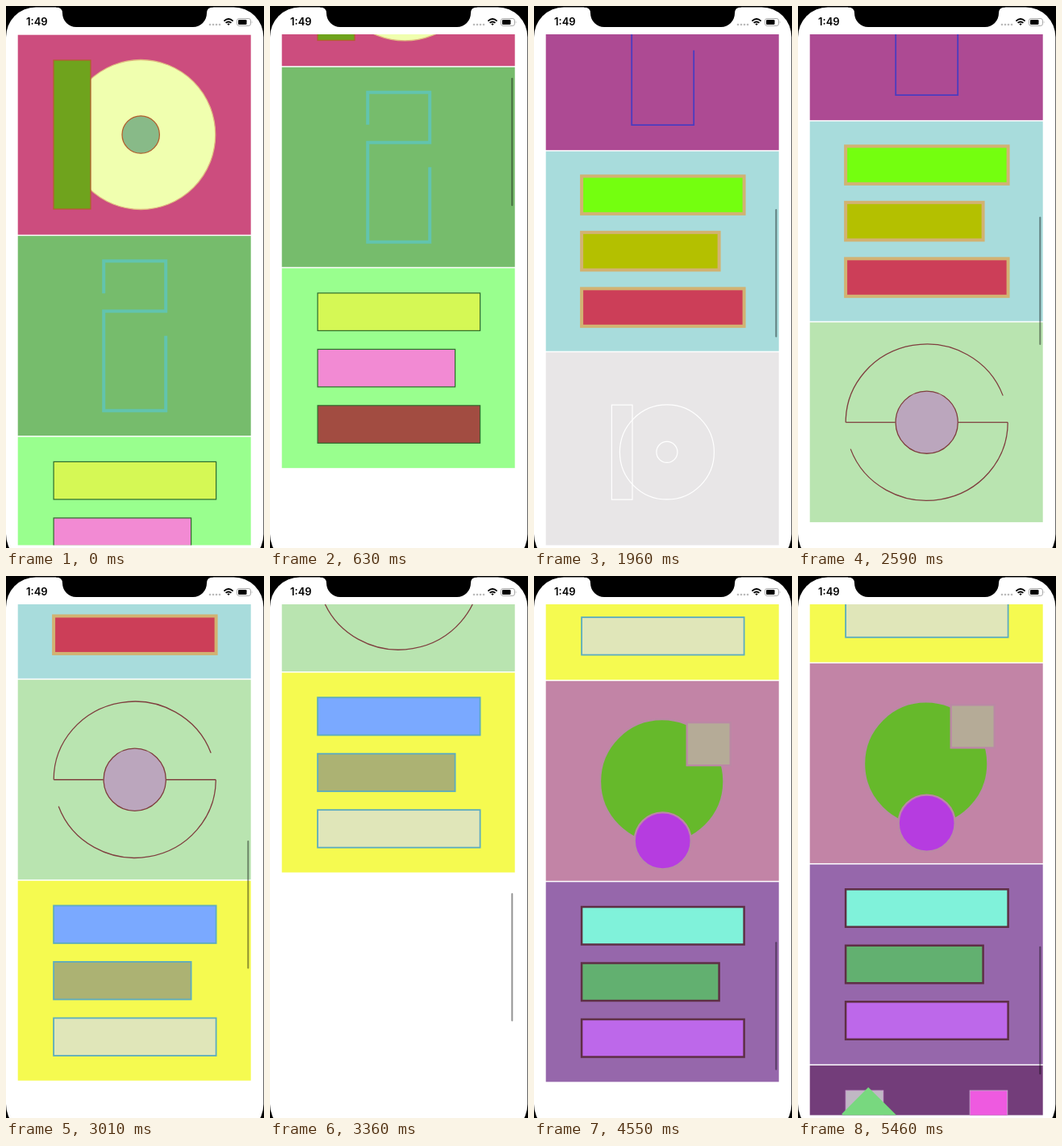
An HTML page for the animation above (5.53 s loop, 320x670 px).

```html
<!DOCTYPE html>
<html lang="en">
<head>
<meta charset="utf-8">
<title>Shape card list</title>
<style>
  html, body { margin: 0; width: 100%; height: 100%; overflow: hidden; background: #000; }
  svg { display: block; width: 320px; height: 670px; }
  text { font: 600 13px Inter, Roboto, sans-serif; }
</style>
</head>
<body>
<svg id="stage" viewBox="0 0 320 670">
  <defs>
    <clipPath id="list"><rect y="35" width="320" height="631.5"/></clipPath>
    <clipPath id="face"><rect width="289" height="247"/></clipPath>
  </defs>
  <rect y="1.5" width="319.4" height="688.5" rx="37" fill="#fff"/>
  <g id="cards" clip-path="url(#list)"></g>
  <path d="M62 0H257V1.5Q249 1.5 249 9A17 17 0 0 1 232 26H87A17 17 0 0 1 70 9Q70 1.5 62 1.5Z"/>
  <text x="25" y="24.3">1:49</text>
  <g fill="#bbb">
    <circle cx="253" cy="23" r="1.3"/><circle cx="257" cy="23" r="1.3"/>
    <circle cx="261" cy="23" r="1.3"/><circle cx="265" cy="23" r="1.3"/>
  </g>
  <g fill="none" stroke="#000" stroke-width="1.9">
    <path d="M270.4 18.6Q276 13.6 281.6 18.6M272.6 20.9Q276 17.9 279.4 20.9"/>
    <path d="M274.3 22.2L276 24L277.7 22.2Q276 21 274.3 22.2Z" fill="#000" stroke="none"/>
  </g>
  <rect x="286.5" y="15.5" width="17" height="9" rx="2.6" fill="none" stroke="#aaa"/>
  <rect x="288" y="17" width="10.5" height="6" rx="1.2"/>
  <path d="M304.8 18.5Q306.4 20 304.8 21.5Z" fill="#aaa"/>
  <rect id="thumb" x="299.3" width="2" height="158.5" rx="1" fill="#000" fill-opacity=".42"/>
</svg>
<script>
const LOOP = 5530, STEP = 70, LEFT = 14.7, TOP = 35.7, PITCH = 248.5;

// Card artwork, in coordinates relative to the card's corner.
const rect = (x, y, w, h, fill, extra = '') =>
  `<rect x="${x}" y="${y}" width="${w}" height="${h}" fill="${fill}" ${extra}/>`;
const disc = (x, y, r, fill) => `<circle cx="${x}" cy="${y}" r="${r}" fill="${fill}"/>`;
const card = (bg, stroke, width, art) =>
  rect(0, 0, 289, 247, bg) +
  `<g clip-path="url(#face)" stroke="${stroke}" stroke-width="${width}">${art}</g>`;

const bars = (bg, stroke, width, fills) => card(bg, stroke, width,
  fills.map((f, i) => rect(44.4, 30.7 + i * 69.5, i === 1 ? 170.5 : 201.5, 46.5, f)).join(''));

const two = (bg, stroke, width) => card(bg, stroke, width,
  '<path fill="none" d="M106.5 71V31H183.5V93H106.5V216H183.5V123.5"/>');

const ten = card('#cc4d7e', '#b2602f', 1.3,
  `<circle cx="152.5" cy="123.3" r="92.5" fill="#f0ffaf" stroke="#e0b880"/>` +
  disc(152.5, 123.3, 23.2, '#88ba88') + rect(44.3, 31.3, 46, 184, '#6fa31d'));

const orbit = card('#b9e4b0', '#7f3f3f', 1.3,
  '<path fill="none" d="M44.5 123.5A100.5 96.5 0 0 1 239.5 90.5' +
  'M245.5 123.5A100.5 96.5 0 0 1 50.5 156.5M44.5 123.5H106M184 123.5H245.5"/>' +
  disc(145, 123.5, 38.6, '#bba6bd'));

const blobs = card('#c284a6', '#bb88a5', 2.3,
  disc(144, 124, 76.7, '#66b92b') + rect(175, 51.3, 54, 53, '#b5ab97') +
  disc(145, 197.5, 35, '#b63ce0'));

const squares = card('#733d7a', '#c8a0cc', 1,
  rect(44.5, 31, 46.5, 46.5, '#c0b8c4') + rect(198.5, 31, 46.5, 46.5, '#ee5ae0') +
  '<path fill="#78d87f" stroke="none" d="M72.5 27L39.5 60L76 98L110 64Z"/>');

const skeleton = card('#e8e6e7', '#fff', 1.2,
  rect(81.7, 65, 25.6, 117, 'none') + disc(150.2, 123.3, 58.5, 'none') +
  disc(150.2, 123.3, 13, 'none'));

// [artwork, time the placeholder appears, time the artwork replaces it]
const deck = [
  [ten, 0, 0],
  [two('#76bc6c', '#62c4ae', 4), 0, 0],
  [bars('#99ff8e', '#2f6b2c', 1.2, ['#d5f855', '#f28ad3', '#a24c41']), 0, 0],
  [two('#ad4a93', '#4a3cc0', 1.8), 1120, 1400],
  [bars('#a8dcdc', '#d2b272', 4, ['#74ff0f', '#b4c000', '#cc3e58']), 1330, 1610],
  [orbit, 1540, 2170],
  [bars('#f5fa50', '#5cacc0', 1.8, ['#7aa9ff', '#acb273', '#e0e6b9']), 2660, 2940],
  [blobs, 3430, 3710],
  [bars('#9667ab', '#5e2f45', 2.5, ['#80f2da', '#62b070', '#bd68ea']), 3990, 4270],
  [squares, 4690, 4970]
];

const make = art => {
  const g = document.createElementNS('http://www.w3.org/2000/svg', 'g');
  g.innerHTML = art;
  document.getElementById('cards').append(g);
  return g;
};
const rows = deck.map(([art, shown, loaded]) =>
  ({ shown, loaded, art: make(art), ghost: make(skeleton) }));
const thumb = document.getElementById('thumb');

// Each flick: a short accelerating drag, then exponential momentum.
const TAU = 515;
const flicks = [
  { start: 350, release: 560, from: 0, to: 107.5, rest: 902.5 },
  { start: 2660, release: 2870, from: 889, to: 987, rest: 1671.6 }
];

function scrollAt(t) {
  const f = flicks.findLast(f => t >= f.start);
  if (!f) return 0;
  if (t < f.release) {
    const x = (t - f.start) / (f.release - f.start);
    return f.from + (f.to - f.from) * x ** 3;
  }
  return f.rest - (f.rest - f.to) * Math.exp((f.release - t) / TAU);
}

function draw(t) {
  const s = scrollAt(t);
  rows.forEach((r, i) => {
    // A new row slides up into its slot.
    const lag = r.shown ? 12 * Math.max(0, 1 - (t - r.shown) / 140) : 0;
    const place = `translate(${LEFT} ${TOP + i * PITCH - s + lag})`;
    for (const g of [r.art, r.ghost]) g.setAttribute('transform', place);
    r.art.style.display = t >= r.loaded ? '' : 'none';
    r.ghost.style.display = t >= r.shown && t < r.loaded ? '' : 'none';
  });
  thumb.setAttribute('y', 36 + s * 0.253);
  thumb.style.display = t > flicks[0].start ? '' : 'none';
}

const begin = performance.now();
function tick() {
  const t = (performance.now() - begin) % LOOP;
  draw(Math.floor(t / STEP) * STEP);
  requestAnimationFrame(tick);
}
tick();
</script>
</body>
</html>
```
